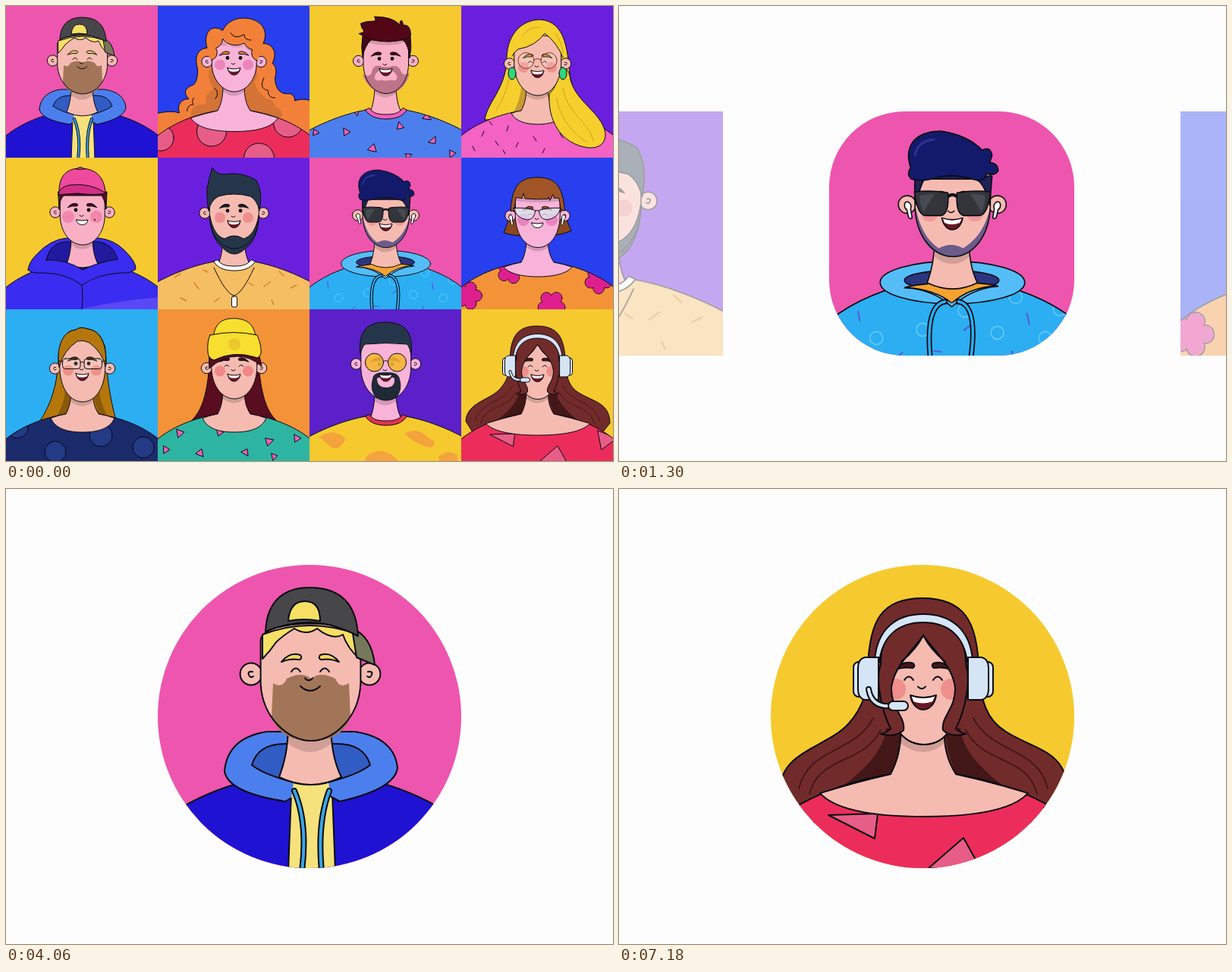
An HTML page that plays this animation: 800 by 600 pixels, repeating every 7.21 s.

```html
<!DOCTYPE html>
<html lang="en">
<head>
<meta charset="utf-8">
<title>Avatars</title>
<style>
html, body { margin: 0; width: 100%; height: 100%; overflow: hidden; background: #fdfdfd; }
#stage { position: absolute; left: 0; top: 0; width: 800px; height: 600px; overflow: hidden; }
.tile { position: absolute; overflow: hidden; }
.tile svg { display: block; width: 100%; height: 100%; }
</style>
</head>
<body>
<svg width="0" height="0" style="position:absolute">
  <clipPath id="loose"><path id="loosePath"/></clipPath>
  <clipPath id="tee"><path id="teePath"/></clipPath>
</svg>
<div id="stage"></div>
<script>
const PINK = '#ee55ae', YELLOW = '#f6ca2e', BLUE = '#273fee', VIOLET = '#6a1fdf';
const ROSE = '#f9b3d8', PEACH = '#f6bbb0', BLUSH = '#f9b0c4', SLATE = '#26364a', SHADE = '#00000026';
const CUT = {
  loose: 'M-6 176C18 154 50 143 79 138H122C151 143 183 154 207 176V205H-6Z',
  tee: 'M-6 167C18 153 50 141 75 137H126C151 141 183 153 207 167V205H-6Z'
};
loosePath.setAttribute('d', CUT.loose);
teePath.setAttribute('d', CUT.tee);

// Shape helpers
const P = (d, fill = 'none', extra = '') => `<path d="${d}" fill="${fill}" ${extra}/>`;
const F = (d, fill) => P(d, fill, 'stroke="none"');
const E = (x, y, rx, ry, fill = 'none', extra = '') =>
  `<ellipse cx="${x}" cy="${y}" rx="${rx}" ry="${ry}" fill="${fill}" ${extra}/>`;
const C = (x, y, r, fill, extra) => E(x, y, r, r, fill, extra);
const R = (x, y, w, h, r, fill) => `<rect x="${x}" y="${y}" width="${w}" height="${h}" rx="${r}" fill="${fill}"/>`;
const L = (d, color, w = 1) => P(d, 'none', `stroke="${color}" stroke-width="${w}"`);
const flip = (s, axis = 100.5) => s + `<g transform="matrix(-1 0 0 1 ${2 * axis} 0)">${s}</g>`;
const down = (y, s) => `<g transform="translate(0 ${y})">${s}</g>`;
const zoom = (k, x, y, s) => `<g transform="scale(${1 / k}) translate(${-x} ${-y})" stroke-width="${k}">${s}</g>`;
const big = s => zoom(2, 200, 100, s);
const cord = (d, fill, w) => L(d, '#0a0a12', w) + L(d, fill, w / 2);

const shirt = (fill, pattern = '', cut = 'loose') =>
  F(CUT[cut], fill) + `<g clip-path="url(#${cut})">${pattern}</g>` + P(CUT[cut]);

const neckShade = y => F(`M86 ${y - 8}V${y}Q101 ${y + 11} 114 ${y}V${y - 8}Z`, SHADE);
const neck = (skin, chin = 115) =>
  P('M86 104C86 122 83 132 80 140Q101 150 121 140C117 132 114 122 114 104Z', skin) + neckShade(chin);

// Bare neckline: half width w, lowest point d
function chest(skin, w, d, chin = 115) {
  const y = 138 + (w - 22) * .27, m = y / 2 + 68, h = w / 2 + 11;
  return P(`M86 104C86 122 83 130 79 138Q${101 - h} ${m} ${101 - w} ${y}
    C${101 - w * .85} ${d - 4} ${101 - w * .45} ${d} 101 ${d}
    S${101 + w * .85} ${d - 4} ${101 + w} ${y}Q${101 + h} ${m} 122 138C117 130 114 122 114 104Z`, skin) + neckShade(chin);
}
const collar = fill => P(`M73.5 137L79 134.5C83 142 92 143 101 143S118 142 123 134.5L128.5 137
  C122 147 111 149 101 149S80 147 73.5 137Z`, fill);

function face(skin, { y = 0, chin = 113, ear = 73.5, earX = 65, cheek, size = 7, happy, brow = '#221a22', mouth = 'open', beard = '' }) {
  const k = chin - 15, a = earX + 6.3, b = 201.5 - a;
  const d = `M${a} 50V78C${a + 1} ${k} 86 ${chin} 101 ${chin}S${b - 1} ${k} ${b} 78V50C${b} 35 ${a} 35 ${a} 50Z`;
  const eye = happy ? P('M88 71.5Q91 67 94 71.5') : C(92, 68.5, 2.4, '#0a0a12', 'stroke="none"');
  const mouths = {
    open: P('M92 81.5Q100.5 84.5 109 81.5C108 88 104 91 100.5 91S93 88 92 81.5Z', '#6d1524') +
      F('M92.8 82.2Q100.5 84.8 108.2 82.2L106.5 85.6Q100 88 94.2 85.6Z', '#fff'),
    grin: P('M92.5 81.5Q100 83.5 108 81.5Q107 88 100.5 88T92.5 81.5Z', '#fff'),
    line: P('M94 81Q100.5 87 107 81')
  };
  return flip(C(earX, ear, 7.2, skin) + P(`M${earX + 1} ${ear - 1.5}q-3.5 -.5 -2.5 2t3 1`)) +
    F(d, skin) + beard + P(d) + down(y,
    (cheek ? flip(C(82, 77.5, size, cheek, 'stroke="none"')) : '') +
    flip(eye + P('M81.5 65Q87 58 94 60.5Q95.5 62.5 93.5 63.5Q87 62.5 81.5 65Z', brow)) +
    P('M97 75.8Q99.5 78.5 102 75.8') + mouths[mouth]);
}

function flower(x, y, a) {
  let rim = '', fill = '';
  for (let i = 0; i < 5; i++) {
    const t = a + i * Math.PI * .4, px = x + 11 * Math.cos(t), py = y + 11 * Math.sin(t);
    rim += C(px, py, 7.5, '#e01f8f');
    fill += C(px, py, 7, '#e01f8f', 'stroke="none"');
  }
  return rim + fill + C(x, y, 7, '#e01f8f', 'stroke="none"');
}
const bud = 'M325 256Q325 250 331 251Q337 254 335 262L337 277Q333 281 331 275L329 263Q325 262 325 256Z';

// Each person: background, drawing in a 200 by 200 box
const people = [
  [PINK, shirt('#1f12d2') + F('M88 140H115L117 202H86Z', '#f6e27c') + P('M88 150L86 202M115 150L117 202') +
    P('M44 136Q46 114 72 110H130Q156 114 158 134Q156 148 120 156L101 146L84 156Q46 150 44 136Z', '#4c7fee') +
    P('M62 132Q66 118 84 118H118Q136 118 140 132Q130 140 101 146Q72 140 62 132Z', '#315cc4') +
    F('M90 140H112L114 154L101 148L88 154Z', '#f6e27c') + neck(PEACH, 118) +
    cord('M90 149Q99 170 95 202', '#3aa5e8', 4) + cord('M113 149Q105 170 108 202', '#3aa5e8', 4) +
    face(PEACH, { ear: 72, earX: 61.5, chin: 116, happy: 1, brow: '#f3d95c', mouth: 'line', y: -1,
      beard: F('M76 78Q82 82 85 75Q95 70 101 75Q107 70 117 75Q120 82 126 78L127 100Q122 116 101 116Q80 116 75 100Z', '#a37558') }) +
    P('M69 46Q100 34 132 46L133 62Q125 55 122 46Q115 50 105 42Q98 47 90 42Q82 47 78 51Q74 57 69 62Z', '#f6e064') +
    P('M128 42Q141 47 143 66L131 61Z', '#77775c') +
    P('M71 44C72 22 85 15 100 15C120 15 131 25 132 47Q115 38 100 38Q85 38 71 44Z', '#47474a') +
    P('M86 37Q87 24 97 24T107 37Q96 35 86 37Z', '#f6e064')],

  [BLUE, big(P(`M195 384Q235 374 257 382C250 360 262 345 282 345C262 325 280 312 294 308C304 300 306 280 305 265
      C296 235 305 212 330 211C322 180 332 158 352 158Q364 158 371 165C380 145 400 132 425 132C465 132 485 155 483 180
      Q482 190 478 199C500 198 512 218 507 238Q505 245 502 251C515 260 512 280 509 290C510 315 520 335 548 331
      Q562 335 561 350C575 345 590 345 605 350V470H195Z`, '#f38038') +
      F('M336 270C328 290 345 305 345 322C325 330 322 350 330 358Q310 360 300 364Q286 368 288 395L360 377Q373 340 372 318L342 262Z', '#d37336') +
      F('M458 265Q470 280 455 300C462 330 480 335 485 345C500 345 510 355 508 365Q530 372 527 392L515 395L443 376Q428 340 428 318Z', '#d37336') +
      P('M350 317Q364 328 352 345M295 342Q288 352 294 360Q278 360 277 377M480 289C470 310 475 320 490 322Q492 345 509 342')) +
    shirt('#ec2d5b', big(C(342, 431, 39, '#e85d88') + C(467, 502, 40, '#e85d88') + C(544, 407, 39, '#e85d88') + C(208, 448, 34, '#e85d88'))) +
    chest(ROSE, 57.5, 165.5, 113) + face(ROSE, { cheek: '#ea86bb', brow: '#f38038' }) +
    big(F('M356 213Q371 200 371 190C380 211 410 212 428 206Q436 218 449 220L448 205H360Z', SHADE) +
      F(`M341 242C352 243 362 225 353 211Q370 205 371 186C380 204 410 208 428 198Q436 212 449 215C444 230 452 242 463 244
      C470 225 480 215 476 200C476 160 455 138 425 138C400 138 380 150 371 172C340 160 335 190 336 212C330 225 335 235 341 242Z`, '#f38038') +
      P('M341 242C352 243 362 225 353 211Q370 205 371 186C380 204 410 208 428 198Q436 212 449 215C444 230 452 242 463 244') +
      P('M392 171Q402 190 428 175Q428 190 446 190'))],

  [YELLOW, shirt('#4c7fee', big(P(`M290 422l18 10-16 10zM353 479l17-16 6 21zM436 406l13 15-18 4zM509 384l12 16-23-3z
      M318 378l12-2-4 13zM513 459l19-15v18zM453 490l17 1-11 12zM212 425l14 10-16 6zM570 480l16 8-15 12z`, '#f45fb8')), 'tee') +
    neck(BLUSH, 115) + collar('#f45fb8') +
    face(BLUSH, { y: 1, ear: 72.5, earX: 64.7, chin: 115.5, brow: '#530616', beard: big(
      F('M340 280Q362 292 366 268Q370 256 385 258Q402 264 420 258Q434 256 440 270Q446 288 464 276Q450 331 402 331Q356 328 340 280Z', '#bd7488') +
      F('M372 292C370 278 385 264 402 266S430 278 431 290Q427 300 416 295Q402 299 390 295Q376 300 372 292Z', BLUSH)) }) +
    big(F('M350 192H454Q440 203 402 203T350 192Z', SHADE) +
      P('M340 236Q335 210 340 180H466Q470 210 464 238Q462 205 447 190H362Q345 205 340 236Z', '#420a16') +
      P(`M331 173Q342 170 344 166Q336 158 335 146Q350 139 370 140Q377 138 371 128Q420 128 438 150Q438 137 443 138Q446 142 447 150
      Q467 148 467 178Q455 192 410 194Q360 195 331 173Z`, '#530616'))],

  [VIOLET, P('M60 75C58 40 78 18 104 18C136 20 140 55 143 90L155 150H31C34 128 56 112 60 75Z', '#f6cf2c') +
    F('M80 100Q78 125 68 142L80 138L87 112Z', '#c99a2e') +
    shirt('#f462c4', P('M30 165l-3 7M45 178l4 6M62 158l-2 7M75 180l-3 6M95 172l4 6M110 188l-3 6M55 190l3 5M15 185l3 6M130 168l4 6M37 152l4 5')) +
    chest(PEACH, 35, 156, 118) +
    P('M131 78Q141 82 143 92C147 125 186 140 190 168Q190 188 168 187C130 182 114 150 116 116Q128 105 131 78Z', '#f6cf2c') +
    L('M134 108C138 140 170 155 174 178M126 122C130 150 150 170 166 180M64 92Q58 120 46 138', '#d0a026') +
    face(PEACH, { y: 3.5, ear: 76, earX: 63.5, chin: 118, cheek: '#ef938f', happy: 1, brow: '#b98a15' }) +
    F('M67 66C66 38 82 20 104 19C128 21 137 45 134 68Q126 48 110 36Q98 53 75 57Q70 60 67 66Z', '#f6cf2c') +
    P('M67 66Q70 60 75 57Q98 53 110 36Q126 48 134 68') +
    L('M80 40Q90 26 104 28M124 36Q133 48 134 62', '#d0a026') +
    flip(C(85.5, 72, 10.5, '#ffffff22', 'stroke="#7b3520"')) + L('M96 71Q100 68 105 71', '#7b3520') +
    flip(E(67, 89, 5, 8, '#2fd67b'))],

  [YELLOW, shirt('#3a2cf0') + F('M101 199Q150 188 202 184V202H101Z', '#5a48f5') +
    P(`M29 148Q30 138 40 128Q58 108 80 106H122Q142 108 156 122Q172 138 171 147Q165 153 150 152Q120 154 100 168
      Q78 152 50 152Q33 153 29 148Z`, '#3a2cf0') +
    P('M53 135Q58 112 80 111H122Q142 114 147 134Q120 138 101 147Q80 135 53 135Z', '#211a9e') +
    neck(BLUSH, 115) + F('M54 134.5Q80 134 101 148Q120 138 146 133.5Q138 152 100 166Q66 150 54 134.5Z', '#3a2cf0') +
    P('M53 135Q80 134 101 148Q120 138 147 134M100 168Q102 185 100 202') +
    face(BLUSH, { y: .5, ear: 72, chin: 115, cheek: '#f287ae', size: 8, brow: '#4a0a20', mouth: 'grin' }) + C(117, 82, 1, '#300', 'stroke="none"') +
    P('M69 45H133L132 68Q130 55 126 50H76Q70 56 70 68Z', '#5a0d25') +
    P('M70 44C70 22 82 14 98 14S130 22 131 47Q100 36 70 46Z', '#ef4a9c') + P('M93 15Q98 10 103 15Z', '#ef4a9c') +
    P('M69 49Q70 38 85 36Q112 33 132 47Q115 50 95 47Q78 48 69 49Z', '#d42f86')],

  [VIOLET, shirt('#f6be62', L('M22 158l8-5M48 165l6 8M75 190l6-5M30 185l8 4M140 170l8-6M160 150l6 6M175 172l8-4M150 188l3 6M60 148l6 3M120 165l6 4', '#d6842c', 1.5), 'tee') +
    neck(PEACH, 122) + collar('#fff') + P('M74 145Q90 180 101 182Q112 178 127 145') + R(97.5, 183, 7, 14, 2, '#fff') +
    face(PEACH, { y: 1.5, ear: 73, earX: 62, chin: 120, cheek: '#ef8f90', brow: '#151c28', beard:
      P(`M68.5 76C72 94 78 104 88 107Q101 99 113 107C123 104 130 94 133 76C133 100 124 114 116 119Q101 135 86 119
      C77 113 69 98 68.5 76Z`, SLATE) }) +
    P('M67 70Q63 45 66 36Q68 25 72 13Q77 22 86 22Q112 18 130 30Q139 45 134 70Q131 56 122 51Q100 45 80 51Q70 56 67 70Z', SLATE)],

  [PINK, shirt('#2caef2', zoom(1.61, 278, 139,
      [[340, 437], [401, 426], [499, 430], [562, 437], [523, 383], [581, 399], [456, 401]]
        .map(([x, y]) => C(x, y, 8.5, 'none', 'stroke="#62c9fb"')).join('') +
      L('M316 402l2 12M455 427l10-8M538 405l3 14M416 454l9 1M370 460l4-4M520 462l-2-8', '#5a57d8', 2))) +
    zoom(1.61, 278, 139, E(440, 364, 95, 28, '#54bdf8') + E(439, 361, 62, 13, '#2b357f') +
      P('M378 370Q440 358 499 368Q462 370 439 391Q420 374 378 370Z', '#f7a12f')) + neck(PEACH, 119) +
    zoom(1.61, 278, 139, F('M377 371Q414 372 439 396Q466 371 500 369Q490 386 439 391Q400 389 377 371Z', '#54bdf8') +
      P('M377 371Q414 372 439 396Q466 371 500 369') +
      cord('M430 389Q404 394 411 465', '#2caef2', 7) + cord('M448 389Q474 394 464 465', '#2caef2', 7)) +
    face(PEACH, { y: 5.5, ear: 76, earX: 63.7, chin: 118.6, cheek: '#ef9a98', brow: '#131a4b', beard: zoom(1.61, 278, 139,
      F('M391 262C396 290 406 308 422 319Q438 310 454 319C472 308 485 290 490 262V270C486 306 468 330 440 330S394 306 391 270Z', '#6b5c8c')) }) +
    zoom(1.61, 278, 139,
      P('M391 224H492L489 262Q482 232 470 228H403Q396 240 393 262Q389 250 391 224Z', '#20215a') +
      P(`M386 228Q379 222 385 213C376 185 390 165 425 165Q460 170 479 190Q490 184 492 197Q490 203 489 206Q500 207 500 217
        Q496 224 485 221Q482 232 470 229Q440 220 420 226Q400 232 386 228Z`, '#131a6b') +
      L('M391 196Q394 178 416 176', '#2a3390', 3) + L('M434 251Q440 246 446 251', '#0a0a12', 4) +
      flip(P('M390 245Q410 242 434 246Q436 274 425 276H405Q394 276 390 245Z', '#33353b') +
        F('M397 250Q408 247 416 248L402 271Q397 262 397 250Z', '#474a52'), 440) +
      flip(P('M377 262Q377 257 382 258Q387 261 385 267L387 279Q384 282 382 277L380 268Q377 267 377 262Z', '#fff'), 440))],

  [BLUE, big(P('M331 240Q322 275 312 298Q350 310 402 307Q450 309 490 293Q475 260 470 235Z', '#8b481f')) +
    shirt('#f39237', flower(65, 148, 1.2) + flower(119, 194, -.95) + flower(181, 161, .3) + flower(9, 182, 0)) +
    chest(ROSE, 45, 157, 118) +
    face(ROSE, { y: 4.5, ear: 76.5, chin: 118.5, cheek: '#e884bd', size: 8, happy: 1, brow: '#a15426', mouth: 'grin' }) +
    big(F('M344 206H458V215Q400 222 344 214Z', SHADE) +
      P(`M330 240C334 180 350 152 400 152C455 152 467 182 473 240L461 236Q461 218 457 206L445 207L441 197L438 207L433 213L430 204L428 209
        Q400 211 368 208Q366 198 364 195L361 207L344 205L340 240Z`, '#a15426') +
      flip(P('M338 233Q372 231 395 239Q394 262 374 264Q345 260 338 233Z', '#d9ebf4b0') + P(bud, '#fff'), 400) +
      P('M395 241Q400 236 405 241'))],

  ['#2caef2', P('M43 150C62 122 67 95 69 70C68 45 78 27 92 27Q98 22 108 26C125 28 132 45 132 70C134 95 138 122 146 150Z', '#b5770c') +
    F('M78 95Q80 122 64 146L80 138L87 112Z', '#8b590a') + F('M123 95Q121 122 137 146L122 138L114 112Z', '#8b590a') +
    shirt('#1b2a6b', C(65, 188, 14, '#233a87') + C(15, 156, 14, '#233a87') + C(125, 166, 15, '#233a87') + C(181, 182, 14, '#233a87')) +
    chest(PEACH, 42, 162, 122) + face(PEACH, { y: 3, ear: 78, earX: 64.5, chin: 122, cheek: '#ef8f84', brow: '#7a4c0a' }) +
    P('M70 76C66 50 74 29 92 27Q98 22 108 26C126 28 134 50 131 76Q128 58 110 44Q102 40 94 42Q76 54 70 76Z', '#b5770c') +
    flip(R(74.5, 65, 23.5, 13.5, 4, '#ffffff22') + P('M75 69L70 68')) + P('M98 70Q100.5 68 103 70')],

  ['#f39237', P('M70 55H130C136 90 135 130 160 150H41C66 130 66 90 70 55Z', '#5a0d20') +
    shirt('#2eb5a2', P('M25 158l10 4-8 7zM50 190l8-6 2 10zM78 158l9 4-7 5zM142 170l11 2-8 8zM180 165l9 5-8 5zM150 190l8 3-6 6zM8 180l8 5-8 5zM110 188l8-4 1 9z', '#f45fb8')) +
    chest(PEACH, 42, 162, 118) + face(PEACH, { y: 4, ear: 77.5, earX: 64.5, chin: 118, cheek: '#f0888a', happy: 1, brow: '#4a0a18' }) +
    P('M68 58Q100 50 133 58L137 75Q122 62 105 62Q85 62 68 78Z', '#5a0d20') +
    P('M73 38C75 18 85 12 100 12S128 18 129 38Z', '#f8de2e') +
    P('M69 34Q100 27 131 34Q137 48 136 58Q133 66 128 63Q100 54 74 67Q66 64 66 56Q65 42 69 34Z', '#f8de2e') +
    C(101, 46, 8, '#ecc82c', 'stroke="none"')],

  ['#5b20c9', down(4, shirt(YELLOW, ['M12 165Q25 155 38 160T45 172Q35 185 25 175T12 165Z', 'M125 160Q140 152 150 160T165 170Q165 182 150 176T125 160Z',
      'M75 190Q90 178 105 186T120 205H70Z', 'M170 190Q182 180 195 188V205H172Z'].map(d => F(d, '#f5a33c')).join(''), 'tee') +
    neck(ROSE, 117) + collar('#e3324f')) +
    face(ROSE, { y: 4, ear: 72, earX: 61.5, chin: 120, brow: '#151c28', beard:
      F('M83 92Q84 82 101 83Q117 82 119 92Q123 106 115 116Q101 124 87 116Q79 106 83 92Z', '#1f2a36') +
      F('M89 91Q101 85 112 91Q113 103 101 103T89 91Z', ROSE) }) +
    P('M67 60C63 25 80 17 100 17S138 25 134 60Q132 50 129 46Q100 43 73 46Q69 50 67 60Z', SLATE) +
    flip(C(85.5, 70, 12, '#f5b52ee0')) + P('M97.5 69Q100.5 66 103.5 69')],

  [YELLOW, big(P(`M328 235C330 175 345 144 400 144S472 175 474 235C476 280 485 305 510 320C550 345 590 345 592 400L560 440H240
      L212 395C215 345 275 340 302 310C325 285 328 260 328 235Z`, '#722b2b') +
      flip(F('M352 315Q350 350 295 392L358 376Q371 345 372 318Z', '#431717') +
        L('M335 302C310 350 250 340 237 395M345 318C320 365 265 350 251 402', '#461818', 2), 401)) +
    shirt('#ec2d5b', big(P('M276 430L341 428L337 461ZM408 500L454 460L478 503ZM560 420L610 440L570 470Z', '#e85d88'))) +
    chest(PEACH, 68.5, 166, 118) +
    face(PEACH, { y: 4.5, ear: 80, earX: 69, chin: 118.5, cheek: '#ee8f8c', happy: 1, brow: '#431717' }) +
    big(flip(P('M401 193C385 215 362 235 359 262C358 290 378 300 375 318Q365 328 345 323Q355 320 358 316C345 290 338 250 345 232C345 190 360 178 401 178Z', '#722b2b'), 401) +
      F('M360 186Q401 160 442 186L432 216Q412 208 401 191Q390 208 370 216Z', '#722b2b') +
      P('M372 228Q392 211 401 193Q410 211 430 228') +
      P('M337 226C340 185 365 165 401 165S463 185 466 226L459 228C455 195 435 176 401 176S347 195 343 228Z', '#d5e5f5') +
      flip(R(309, 228, 16, 46, 7, '#d5e5f5') + P('M342 222H324Q315 224 315 236V264Q315 276 324 278H342Z', '#d5e5f5'), 401) +
      cord('M329 264Q333 288 358 286', '#d5e5f5', 8) + R(355, 280, 26, 12, 6, '#d5e5f5'))]
];

const tiles = people.map(([bg, art]) => {
  const tile = document.createElement('div');
  tile.className = 'tile';
  tile.style.background = bg;
  tile.innerHTML = `<svg viewBox="0 0 200 200" fill="none" stroke="#0a0a12" stroke-width="1"
    stroke-linejoin="round" stroke-linecap="round">${art}</svg>`;
  return stage.appendChild(tile);
});

const LOOP = 7210, HERO = 6, ZOOM = [1060, 1480], FADE = 180;
const order = [6, 2, 3, 1, 0, 7, 4, 5, 8, 9, 10, 11];
const swaps = [1520, 2270, 3000, 3730, 4480, 4910, 5300, 5730, 6090, 6440, 7000];
const clamp = v => Math.min(1, Math.max(0, v));

function place(tile, cx, cy, size, radius, alpha, z) {
  Object.assign(tile.style, {
    left: cx - size / 2 + 'px', top: cy - size / 2 + 'px', width: size + 'px', height: size + 'px',
    borderRadius: radius + '%', opacity: alpha, zIndex: z, visibility: alpha > 0 ? 'visible' : 'hidden'
  });
}

function draw(now) {
  const t = now % LOOP;
  const p = (1 - Math.cos(Math.PI * clamp((t - ZOOM[0]) / (ZOOM[1] - ZOOM[0])))) / 2;
  if (p < 1) {
    const pitch = 200 + 428 * p;
    tiles.forEach((tile, i) => {
      const x = 500 - 100 * p + (i % 4 - 2) * pitch, y = 300 + (Math.floor(i / 4) - 1) * pitch;
      const hero = i === HERO;
      place(tile, x, y, 200 + 200 * p, hero ? 50 * p : 0, hero ? 1 : 1 - p, hero ? 1 : 0);
    });
  } else {
    const n = swaps.filter(s => s <= t).length;
    const q = n ? clamp((t - swaps[n - 1]) / FADE) : 1;
    tiles.forEach((tile, i) => {
      const k = order.indexOf(i);
      const alpha = k === n ? q : k === n - 1 && q < 1 ? 1 : 0;
      place(tile, 400, 300, 400, 50, alpha, k);
    });
  }
}

const start = performance.now();
(function tick() {
  draw(performance.now() - start);
  requestAnimationFrame(tick);
})();
</script>
</body>
</html>
```
